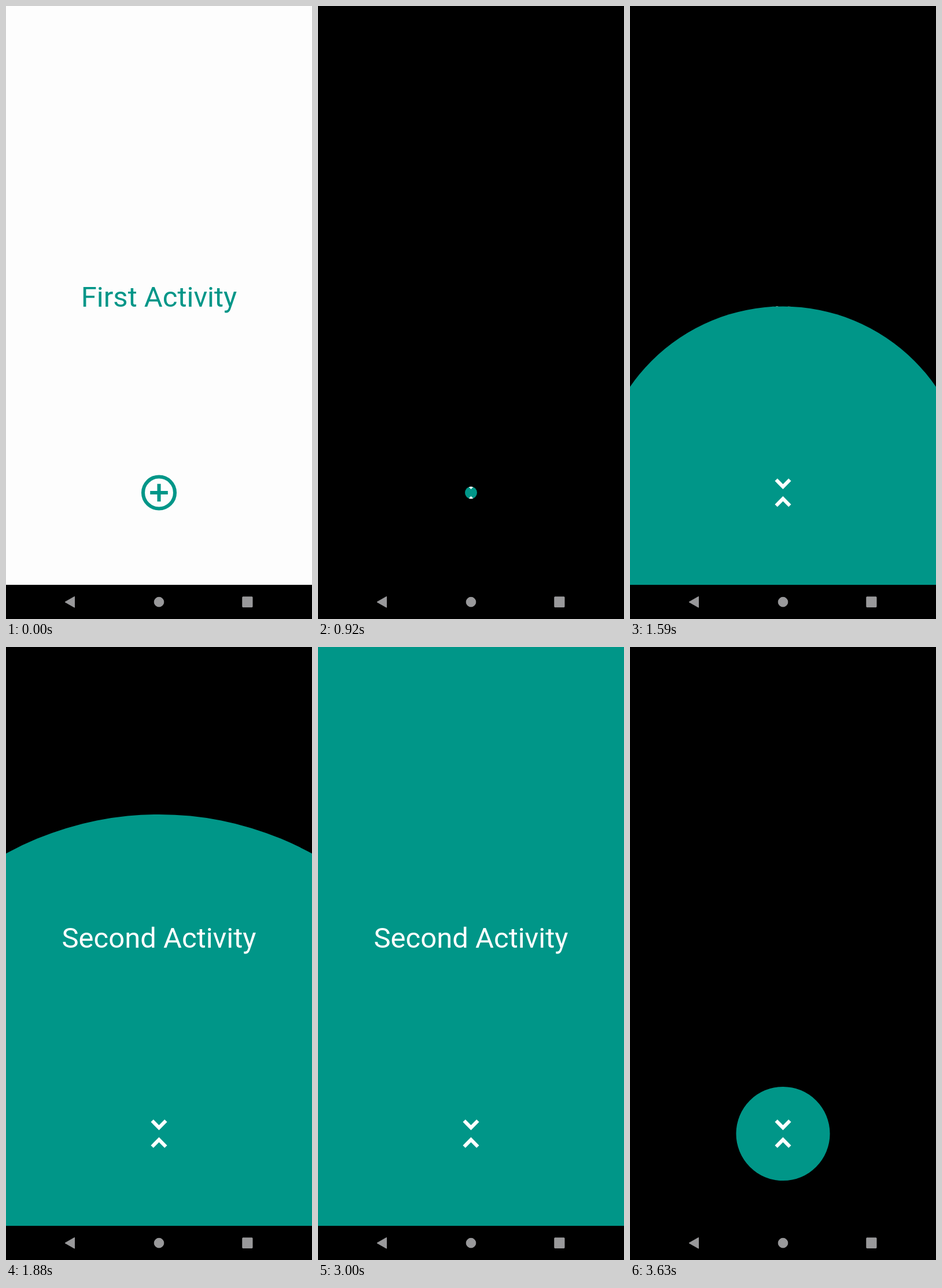
Animation, 529 px wide and 1058 px high, one loop 3670 ms. Source, as an HTML page:

```html
<!DOCTYPE html>
<html lang="en">
<head>
<meta charset="utf-8">
<title>Circular reveal</title>
<style>
  html, body { margin: 0; width: 100%; height: 100%; overflow: hidden; background: #000; }
  svg { display: block; width: 100%; height: 100%; }
  text { font: 49px Roboto, sans-serif; text-anchor: middle; }
</style>
</head>
<body>
<svg viewBox="0 0 529 1058">
  <clipPath id="reveal"><circle id="hole" cx="264.5" cy="840" r="0"/></clipPath>

  <g id="first" fill="#009688">
    <rect width="529" height="999" fill="#fdfdfd"/>
    <text x="264.5" y="519">First Activity</text>
    <g fill="none" stroke="#009688" stroke-width="6.1">
      <circle cx="264.5" cy="840" r="27.5"/>
      <path d="M249.2 840h30.6M264.5 824.7v30.6"/>
    </g>
  </g>

  <g id="second" clip-path="url(#reveal)" fill="#fff">
    <rect width="529" height="999" fill="#009688"/>
    <text x="264.5" y="519">Second Activity</text>
    <path transform="translate(264.5 840) scale(3.055) translate(-12 -12)"
      d="M7.41 18.59 8.83 20 12 16.83 15.17 20l1.41-1.41L12 14zM16.59 5.41 15.17 4 12 7.17 8.83 4 7.41 5.41 12 10z"/>
  </g>

  <rect y="999" width="529" height="59"/>
  <g fill="#99999b" stroke="#99999b" stroke-linejoin="round">
    <path d="M102 1028.7 118.5 1019.3v18.8z"/>
    <circle cx="264.5" cy="1028.6" r="8.3"/>
    <rect x="408.8" y="1019.8" width="17.2" height="17.6" rx=".6"/>
  </g>
</svg>
<script>
const LOOP = 3670, FRAME = 1000 / 24, MAX_R = 1099;
const OPEN = { start: 784, length: 2188 };
const CLOSE = { start: 2782, length: 1028 };
const first = document.getElementById('first');
const hole = document.getElementById('hole');

// Accelerate-decelerate easing
const ease = u => (1 - Math.cos(Math.PI * Math.min(1, Math.max(0, u)))) / 2;
const progress = (t, phase) => ease((t - phase.start) / phase.length);

function radius(t) {
  return MAX_R * (t < CLOSE.start ? progress(t, OPEN) : 1 - progress(t, CLOSE));
}

// Picture steps at 24 fps, on a 10 ms grid
function step(t) {
  return 10 * Math.round(Math.floor((t + 3) / FRAME) * FRAME / 10);
}

function draw(now) {
  const t = step(now % LOOP);
  first.style.display = t < OPEN.start ? '' : 'none';
  hole.setAttribute('r', radius(t).toFixed(2));
  requestAnimationFrame(draw);
}
draw(performance.now());
</script>
</body>
</html>
```
